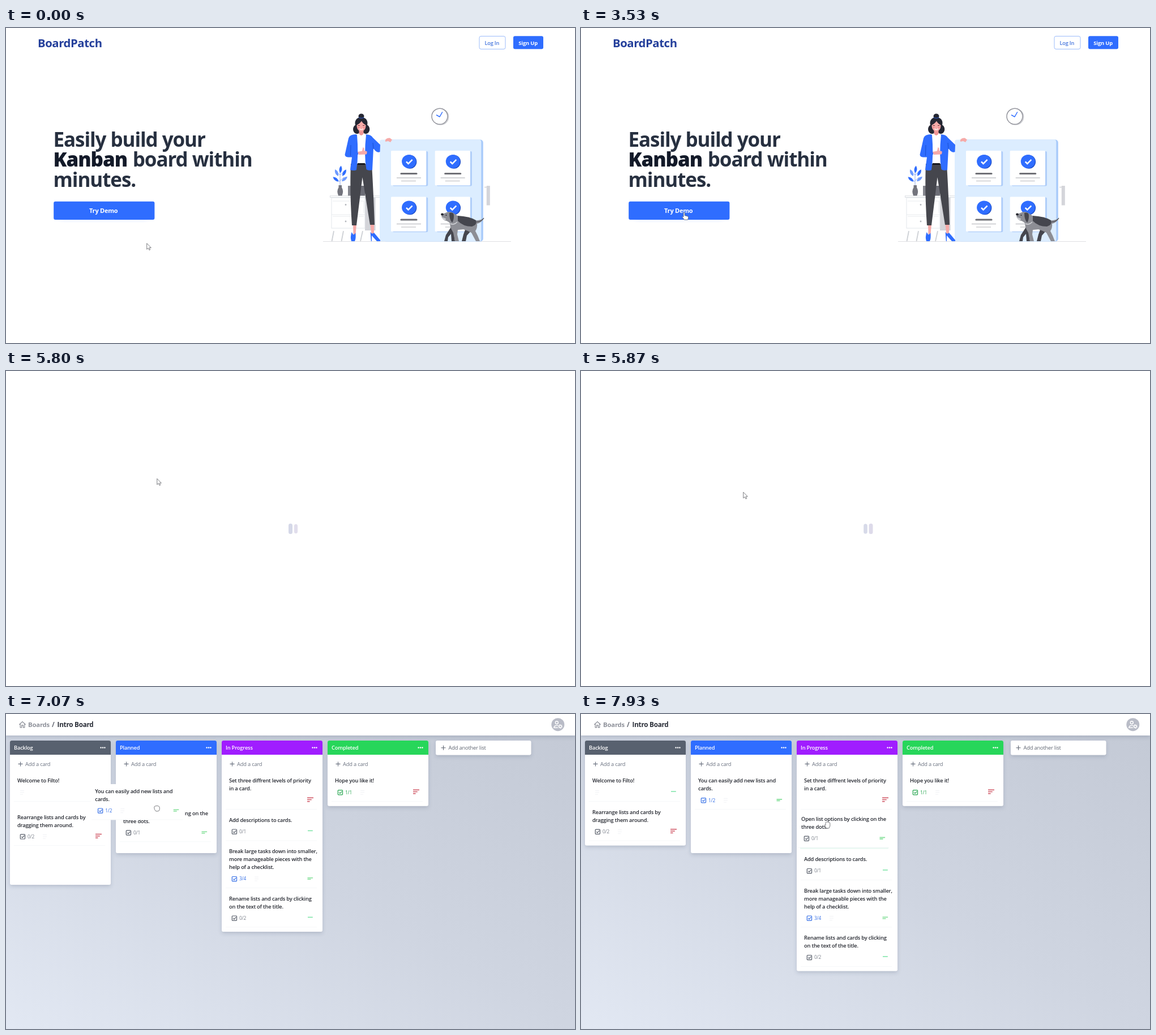
An HTML page that plays this animation: 1005x557 px, repeating every 8000 ms.

```html
<!DOCTYPE html>
<html lang="en">
<head>
<meta charset="utf-8">
<title>Kanban demo</title>
<style>
html, body { margin: 0; width: 100%; height: 100%; overflow: hidden; background: #fff; }
svg { display: block; width: 1005px; height: 557px; }
text { font-family: "Open Sans", "Noto Sans", sans-serif; letter-spacing: -0.02em; white-space: pre; }
.big text { letter-spacing: -0.031em; }
</style>
</head>
<body>
<svg id="stage" viewBox="0 0 1005 557" xmlns="http://www.w3.org/2000/svg"></svg>
<script>
const LOOP = 8000, BLUE = '#2f6dff', NAVY = '#243f9b';
const $ = id => document.getElementById(id);
const rect = (x, y, w, h, fill, r = 0, more = '') =>
  `<rect x="${x}" y="${y}" width="${w}" height="${h}" rx="${r}" fill="${fill}" ${more}/>`;
const path = (d, fill, more = '') => `<path d="${d}" fill="${fill}" ${more}/>`;
const line = (d, color, w = 1, more = '') =>
  `<path d="${d}" fill="none" stroke="${color}" stroke-width="${w}" ${more}/>`;
const oval = (x, y, rx, ry, fill, more = '') =>
  `<ellipse cx="${x}" cy="${y}" rx="${rx}" ry="${ry}" fill="${fill}" ${more}/>`;
const text = (x, y, size, weight, fill, s, more = '') =>
  `<text x="${x}" y="${y}" font-size="${size}" font-weight="${weight}" fill="${fill}" ${more}>${s}</text>`;
const group = (id, body, more = '') => `<g id="${id}" ${more}>${body}</g>`;
const round = 'stroke-linecap="round" stroke-linejoin="round"';

// ---------- landing page ----------
function tile(x, y) {
  const cx = x + 32;
  return rect(x + 3, y + 1, 62.2, 61.5, '#aecdf9', 2) + rect(x, y, 62.3, 61.3, '#fff', 1.5) +
    oval(cx + 1.4, y + 19.6, 12, 12.2, '#1d4cc4') + oval(cx - .3, y + 19, 12.6, 12, BLUE) +
    line(`M${cx - 5} ${y + 19.3}l3.6 3.6l7-7`, '#fff', 2.5) +
    line(`M${cx - 14} ${y + 40.5}h27`, '#6f7076', 3.2, round) +
    line(`M${cx - 22} ${y + 48}h43`, '#c5c6ca', 1.3) +
    line(`M${cx - 14} ${y + 53.5}h26`, '#c5c6ca', 1.3);
}
function leaf(x, y, angle, fill) {
  return path('M0 6.5Q-5 0 0 -6.5Q5 0 0 6.5Z', fill, `transform="translate(${x} ${y}) rotate(${angle})"`);
}
function furniture() {
  return line('M560 377.5H892', '#dfe0e3', 1) +
    rect(634, 300, 18.5, 58, '#d3d4d9') + rect(575, 300, 59, 54, '#fff', 0, 'stroke="#e0e4e8" stroke-width=".9"') +
    line('M575 330H634M577 306H632V327M577 333H632', '#e3e6ea', .8) +
    rect(572.5, 296.8, 88, 2.6, '#fff', 0, 'stroke="#d3d7dc" stroke-width=".8"') +
    oval(600, 312.5, 1.4, 1.4, '#b3b6bc') + oval(600, 342, 1.4, 1.4, '#b3b6bc') +
    line('M579 359L575.5 377M596 359L592.5 377M630 359L626 377', '#cdd0d5', 1.8) +
    line('M590 278V250M590 272L583 266M590 270L597 264M590 260L584 255M590 260L597 254', '#7d9ce8', .8) +
    leaf(591, 250, 6, BLUE) + leaf(584, 256, -25, '#6f9bff') + leaf(597.5, 256, 30, BLUE) +
    leaf(582.5, 267.5, -50, BLUE) + leaf(598, 267, 50, '#6f9bff') +
    path('M587.5 278H593V282Q597 288 593.5 296.5H587Q583.5 288 587.5 282Z', '#73747d') +
    rect(604, 279, 9, 17.5, '#85868e') + rect(613, 278, 8, 18.5, '#4d4e57') + rect(624, 279, 10, 17.5, '#6d6e77') +
    rect(848.8, 279, 6, 34.5, '#d4d5da') + line('M845 281.5h4', '#d4d5da', 1.5) +
    oval(767.6, 157, 14, 14, 'none', 'stroke="#cbccd1" stroke-width="1.6"') +
    oval(766, 156.3, 14, 14, '#fff', 'stroke="#94959d" stroke-width="1.5"') +
    line('M770.5 149L766 157L760.5 154', BLUE, 1.5, round);
}
function woman() {
  const dark = '#252733', skin = '#f6aaa8', trousers = '#45464d';
  return path('M613 347H619L617.5 365H613.5ZM643.5 347H650L650 366H645.5Z', skin) +
    path('M610.5 361L613 365Q616 366 617.3 362Q618.5 372 616 377H610Q607.5 370 610.5 361Z', BLUE) +
    path('M643.5 360Q646 366 650 362L661 375Q662 377 659 377H655L646 367V377H644.8Z', BLUE) +
    path('M609 240H646Q649 290 651 348H643L629.5 264L619 349H611Q607 290 609 240Z', trousers) +
    path('M620 190H636V240H620Z', '#fff') + rect(621, 239, 13, 3, '#17181f') +
    path('M618 188Q607 188 605 195L598.5 224Q599 228 604 228.5H611L608 251Q615 253 619 251Q623 225 620 189Z', BLUE) +
    path('M634 188Q645 188 648 194L661 206.5L660.5 219Q655 222 649 213L647 251Q640 253 636.5 250Q632 225 636 189Z', BLUE) +
    line('M609 207L608.5 226M648 203L649 214', '#174bcb', .9) +
    path('M611 224L622 218.5V223.5L611 228.5Z', BLUE) +
    path('M621 219L629 217.5L630.5 211Q633 211 632.5 217L637.5 218Q638 223 636 223.5L623 224Z', skin) +
    oval(627.5, 156, 5, 4.6, dark) + oval(627.5, 168, 11, 10.5, dark) +
    oval(620, 179, 7, 8.3, dark) + oval(635.5, 179, 6.8, 8.3, dark) +
    path('M623.5 180H631.5V187Q627.5 193 623.5 187Z', '#ee9595') +
    oval(627.5, 173, 8, 9.8, skin) + path('M618.5 172Q617 162 627.5 162Q638 162 636.5 172Q631 170 628 164.5Q624 170 618.5 172Z', dark) +
    line('M621.5 172.5h3.4M630 172.5h3.4', '#69343c', 1) + line('M624.5 178Q627.5 181.5 630.5 178', '#fff', 1.2) +
    oval(622.5, 176, 1.7, 1.2, '#f28a90') + oval(632.5, 176, 1.7, 1.2, '#f28a90') +
    line('M623 158.5Q627.5 160.5 632 158.5', BLUE, .8);
}
function dog() {
  const dark = '#45464e', coat = '#8d8e95';
  return path('M786 352L796 354L791 362L793 377H787L786 364L781 370L780 377H774L777 366ZM812 354L822 358L814 367L812 377H805L808 365Z', dark) +
    path('M776 327Q783 323 790 327L799 333Q818 334 829 340Q838 341 844.5 335.5Q841 344 832 346Q833 353 829 359' +
      'L833 367L837 377H830L822 362Q814 358 808 356L798 357L797 365L800 377H793L790 362Q784 352 784 345Q781 342 778 341Q769 338 769 330Z', coat) +
    path('M798 332Q819 333 830 340Q833 348 823 351Q807 351 798 341Z', dark) +
    path('M783 327q8 -2 8 5q0 8 -3 12q-5 -5 -5 -17z', dark) +
    path('M769 334l8 3l-1 4q-5-2-7-7z', '#c9cace') + line('M785 346q6 3 12 -3', '#d5d6da', 1.6) +
    line('M831 343Q839 343 844 336', dark, 1.2) +
    oval(770.5, 329.6, 2.4, 2, '#25262d') + oval(777.5, 331, 1, 1, '#25262d');
}
const home =
  text(56, 34, 20.3, 700, NAVY, 'BoardPatch') +
  rect(836, 14.5, 46, 22.8, '#fff', 3, 'stroke="#9cbcfb"') + text(845.5, 30, 9.2, 600, '#4173dd', 'Log In') +
  rect(896, 14.2, 53, 23, BLUE, 3) + text(905.3, 30, 9.4, 700, '#fff', 'Sign Up') +
  `<g class="big">${text(83.5, 210, 35, 700, '#273040', 'Easily build your')}` +
  text(83.5, 245.3, 35, 800, '#131a29', 'Kanban') +
  text(223.8, 245.3, 35, 700, '#273040', 'board within') +
  text(83.5, 280.6, 35, 700, '#273040', 'minutes.') + '</g>' +
  rect(96, 316, 154, 23, BLUE, 3, 'opacity=".2" filter="url(#soft)"') +
  rect(84.2, 306.8, 178.2, 32.2, BLUE, 3) + text(147, 327, 11, 700, '#fff', 'Try Demo') +
  furniture() + rect(666, 197.5, 176.8, 180, '#a9cbfa', 5) + rect(660, 197.5, 179.3, 180, '#dcedff', 4) +
  woman() + path('M670 198Q672 194 678 194.5L682 197.5L679 202L675 200L670 201Z', '#f6aaa8') +
  tile(680, 217) + tile(757.7, 217) + tile(680, 298.5) + tile(757.7, 298.5) + dog();

// ---------- boards list ----------
function avatar(x) {
  return oval(x, 18.7, 11.5, 11.5, '#b9bcc7') +
    oval(x - 2, 15.3, 2.5, 2.5, 'none', 'stroke="#fff" stroke-width="1.4"') +
    line(`M${x + .3} 20.6q-7 -1 -7.3 3.6h7`, '#fff', 1.4) +
    oval(x + 4.2, 22, 2.2, 2.2, 'none', 'stroke="#fff" stroke-width="1.4"') +
    oval(x + 4.2, 22, 3.5, 3.5, 'none', 'stroke="#fff" stroke-width="1" stroke-dasharray="1.6 2.06"');
}
const boards =
  text(37.3, 25, 16.7, 700, NAVY, 'Boardpatch') + avatar(956) +
  rect(707.5, 61, 169.5, 32.8, '#3ade67', 3) +
  ['728 71.5', '735.4 71.5', '728 78.9'].map(p => line(`M${p}h4.2v4.2h-4.2z`, '#fff', 1.5)).join('') +
  line('M734.6 81h6M737.6 78v6', '#fff', 1.5) +
  text(748.5, 82.8, 13.5, 500, '#fff', 'Create new board') +
  text(707.5, 110, 9.3, 400, '#8b8f99', 'Visually manage and organize your work.') +
  group('row',
    text(137.5, 79.5, 11.3, 600, '#15171c', 'Intro Board') +
    text(137.5, 96.8, 8, 400, '#a1a5ae', 'Data Created:') +
    text(188.8, 96.8, 8.3, 700, '#757a85', 'Sat Jun 21 2025') +
    line('M133 105.8H508', '#e9ebef', 1) +
    line('M494.8 78.5h8.8M497.5 78v-1h3.4v1M496 79v8.8h6.4v-8.8', '#cfd2d8', 1.2));

// ---------- kanban board ----------
const TOP = 118, ROW2 = TOP + 55.5, SHIFT = 69.5;
const cols = [
  { x: 7, h: 255, color: '#58616f', name: 'Backlog' },
  { x: 194, h: 129.5, color: BLUE, name: 'Planned' },
  { x: 381, h: 338, color: '#a01dff', name: 'In Progress' },
  { x: 568, h: 115.7, color: '#27d65a', name: 'Completed' }
];
const GRAY = '#7b808b', LINK = '#356fe6', DONE = '#26a64f';
// column, y, lines, count, count colour, description icon, priority
const cards = [
  [0, TOP, 'Welcome to Filto!', '', '', 1, 1],
  [0, ROW2, 'You can easily add new lists and|cards.', '1/2', LINK, 1, 2],
  [0, ROW2 + SHIFT, 'Rearrange lists and cards by|dragging them around.', '0/2', GRAY, 1, 3],
  [1, TOP, 'Open list options by clicking on the|three dots.', '0/1', GRAY, 0, 2],
  [2, TOP, 'Set three diffrent levels of priority|in a card.', '', '', 0, 3],
  [2, 187.4, 'Add descriptions to cards.', '0/1', GRAY, 0, 1],
  [2, 242.9, 'Break large tasks down into smaller,|more manageable pieces with the|help of a checklist.', '3/4', LINK, 1, 2],
  [2, 326.4, 'Rename lists and cards by clicking|on the text of the title.', '0/2', GRAY, 0, 1],
  [3, TOP, 'Hope you like it!', '1/1', DONE, 1, 3]
];
function priority(level, r) {
  if (level === 1) return line(`M139 ${r - 1.7}h8.8`, '#79e3a4', 1.5);
  if (level === 2) return line(`M138.5 ${r - 1.8}h9.6M138.5 ${r + .7}h6`, '#83df98', 1.6);
  return line(`M138 ${r - 4.4}h11M138 ${r - 1.2}h7.8M138 ${r + 2}h4.6`, '#cf5362', 1.5);
}
function cardArt([, , title, count, color, note, level]) {
  const lines = title.split('|'), n = lines.length, end = 22.5 + 14 * n, r = 14 * n + 6.7;
  const box = color === GRAY ? '#565c68' : color, nx = count ? 45 : 5;
  return rect(-7, -12.5, 165.6, end + 12.5, '#fff', 2) + line(`M-6 ${end}H155`, '#f6f8f9', 1) +
    lines.map((s, i) => text(0, 3.4 + 14 * i, 9.3, 600, '#23262e', s)).join('') +
    (count ? rect(5.3, r - 4.1, 8.2, 8.2, 'none', 1, `stroke="${box}" stroke-width="1.2"`) +
      line(`M7.2 ${r}l1.7 1.7l3.4-3.6`, box, 1.2) + text(18, r + 2.9, 8.3, 500, color, count) : '') +
    (note ? line(`M${nx} ${r - 3.4}h7M${nx} ${r}h7M${nx} ${r + 3.4}h5`, '#f1f2f5', 1) : '') + priority(level, r);
}
function colArt(c, i) {
  return `<g filter="url(#shade)">${rect(c.x, 47, 178, c.h, '#fff', 3, `id="col${i}"`)}</g>` +
    path(`M${c.x} 72V50q0-3 3-3h172q3 0 3 3v22z`, c.color) + text(c.x + 7, 63, 9.3, 600, '#fff', c.name) +
    [160.6, 164, 167.4].map(d => oval(c.x + d, 59.5, 1.25, 1.25, '#fff')).join('') +
    `<g class="add">${line(`M${c.x + 14.5} 88h8M${c.x + 18.5} 84v8`, 'currentColor', 1.1)}` +
    text(c.x + 27, 91.5, 9.3, 500, 'currentColor', 'Add a card') + '</g>';
}
const kanban =
  `<foreignObject width="1005" height="557"><div xmlns="http://www.w3.org/1999/xhtml" style="height:557px;background:linear-gradient(to top right,#e2e8f3,#cfd5e1 50%,#c3c9d5)"></div></foreignObject>` +
  rect(0, 0, 1005, 38, '#fff', 0, 'filter="url(#shade)"') +
  line('M23.4 18.8L29 13.6L34.6 18.8M25.2 17.6V23.8H27.6V19.8H30.4V23.8H32.8V17.6', '#8b8e97', 1.2) +
  text(39, 23.3, 11.4, 700, '#8f929b', 'Boards') + text(81, 23.3, 11.6, 700, '#666a74', '/') +
  text(90.5, 23.3, 11.7, 700, '#2a2e38', 'Intro Board') + avatar(974.8) +
  cols.map(colArt).join('') +
  group('more', rect(759, 47, 168.5, 25.5, '#fff', 3, 'filter="url(#shade)"') +
    line('M768.5 59.7h8M772.5 55.7v8', '#5f6571', 1.1) + text(781.5, 63.2, 9.3, 400, '#5f6571', 'Add another list')) +
  [0, 2, 4, 5, 6, 7, 8, 3, 1].map(i => group('card' + i,
    (i === 3 ? rect(-2, 50, 156, 3, '#e8f8f1', 1, 'id="mint"') : '') + cardArt(cards[i]))).join('');

// ---------- cursors ----------
const shapes = {
  arrow: 'M0 0V10.5L2.5 8.4L4.3 12L6 11.2L4.3 7.8H7.6Z',
  hand: 'M-1 1Q0 -1 1.2 1V5.6L6 6.8Q8 7.5 7.6 9.5L6.6 13H.5L-3 8.6Q-2.6 7 -1 8Z',
  fist: 'M-4.5 -2Q-4 -4.5 -1.5 -4.3Q1 -5.2 3 -4Q5 -3.5 5 -1V1.5Q4.5 5 2 5H-1.5Q-4.8 2 -4.5 -2Z',
  palm: 'M-3 -4Q-2.4 -5.4 -1.4 -4.4Q-.6 -6.4 .6 -4.6Q2 -6 2.8 -4Q4.6 -4.6 4.8 -2.6V2L3 6H-2L-5 1Q-5 -.6 -3 .6Z'
};
const kinds = [[0, 'arrow'], [2540, 'hand'], [3570, 'arrow'], [4420, 'hand'], [4930, 'arrow'],
  [6270, 'hand'], [6530, 'fist'], [7240, 'palm']];
const route = [[0, 248.7, 380.8], [2330, 248.7, 380.8], [2600, 188, 321], [2670, 188, 321], [3470, 182, 326],
  [3600, 182, 326], [4000, 188, 219], [4195, 188, 219], [4200, 200, 172], [4395, 200, 172], [4470, 209.8, 87.8],
  [4930, 212, 92], [5130, 212, 92], [5800, 266.5, 190], [5930, 303.5, 234.3], [6330, 129, 204], [6540, 129, 204],
  [7070, 266, 167], [7230, 304, 150], [7400, 258, 196], [7480, 253, 198], [7850, 428, 195], [7930, 435, 196], [8000, 435, 196]];

$('stage').innerHTML =
  `<defs><filter id="shade" x="-10%" y="-30%" width="120%" height="180%"><feDropShadow dx="0" dy="3" stdDeviation="3" flood-color="#3b4660" flood-opacity=".2"/></filter>` +
  `<filter id="soft" x="-10%" y="-50%" width="120%" height="220%"><feGaussianBlur stdDeviation="3"/></filter></defs>` +
  rect(0, 0, 1005, 557, '#fff') + group('home', home) + group('boards', boards) + group('kanban', kanban) +
  group('loader', [0, 1, 2].map(i => rect(0, 0, 0, 0, i === 2 ? '#dddaea' : '#d5d8e8', 3.5, `id="bar${i}"`)).join('')) +
  `<path id="cursor" fill="#fff" stroke="#5c5d63" stroke-width=".8" stroke-linejoin="round"/>`;

const clamp = v => Math.max(0, Math.min(1, v));
const mix = (a, b, p) => a + (b - a) * p;
const out = (t, start, dur = 200) => 1 - (1 - clamp((t - start) / dur)) ** 3;
const show = (id, on) => $(id).setAttribute('display', on ? 'inline' : 'none');
const place = (id, x, y) => $(id).setAttribute('transform', `translate(${x} ${y})`);
const adds = [...document.querySelectorAll('.add')];

function cursorAt(t) {
  const i = Math.max(1, route.findIndex(k => k[0] > t)), [t0, x0, y0] = route[i - 1], [t1, x1, y1] = route[i];
  const p = (t - t0) / (t1 - t0);
  return [mix(x0, x1, p), mix(y0, y1, p)];
}
function drawLoader(t) {
  [-.45, 0, .11].forEach((lag, i) => {
    const s = .5 + .5 * Math.cos(2 * Math.PI * ((t - 5800) / 900 - lag)), w = 7 * s, h = 18.5 * s, bar = $('bar' + i);
    bar.setAttribute('x', 493 + 9.5 * i - w / 2);
    bar.setAttribute('y', 279 - h / 2);
    bar.setAttribute('width', w);
    bar.setAttribute('height', h);
    bar.setAttribute('opacity', s);
  });
}
function drawBoard(t, [cx, cy]) {
  const fade = clamp((t - 5930) / 260), gray = [[164, 107], [168, 114], [177, 128]].map(([a, b]) => Math.round(mix(a, b, fade)));
  adds.forEach(g => {
    g.style.color = `rgb(${gray})`;
    g.setAttribute('transform', `translate(0 ${mix(-.6, .4, fade)})`);
  });
  $('more').setAttribute('transform', `translate(843.3 60) scale(${mix(.983, 1, fade)}) translate(-843.3 -60)`);

  const up = out(t, 6971), down = out(t, 6983), gap = out(t, 7710);
  const grow = [t >= 7330 ? -SHIFT : 0, t >= 6960 ? SHIFT : 0, t >= 7700 ? SHIFT : 0, 0];
  cols.forEach((c, i) => $('col' + i).setAttribute('height', c.h + grow[i]));
  cards.forEach(([c, y], i) => {
    let x = cols[c].x + 13;
    if (i === 1 && t >= 6540) {
      const at = Math.min(t, 7230), [px, py] = cursorAt(at), drop = out(t, 7230, 100);
      x = mix(x + px - 129, 207, drop);
      y = mix(y + py - 204, TOP, drop);
    }
    if (i === 2) y -= SHIFT * up;
    if (i === 3) {
      y += SHIFT * down;
      if (t >= 7480) { x += cx - 253; y += cy - 198; }
    }
    if (i > 4 && i < 8) y += SHIFT * gap;
    place('card' + i, x, y);
  });
  // the card in hand is painted last
  const top = $(t >= 7330 ? 'card3' : 'card1');
  if (top.nextSibling) top.parentNode.append(top);
  show('mint', t >= 7700);
}
function draw(t) {
  const pos = cursorAt(t), onBoard = t >= 5900;
  const loading = (t >= 3600 && t < 3930) || (t >= 5130 && t < 5900);
  show('home', t < 3560);
  show('boards', t >= 3930 && t < 4900);
  show('row', t >= 4200);
  show('kanban', onBoard);
  show('loader', loading);
  if (loading) drawLoader(t);
  if (onBoard) drawBoard(t, pos);
  $('cursor').setAttribute('d', shapes[kinds.filter(k => k[0] <= t).pop()[1]]);
  place('cursor', ...pos);
}
const begin = performance.now();
function tick() {
  draw((performance.now() - begin) % LOOP);
  requestAnimationFrame(tick);
}
tick();
</script>
</body>
</html>
```
